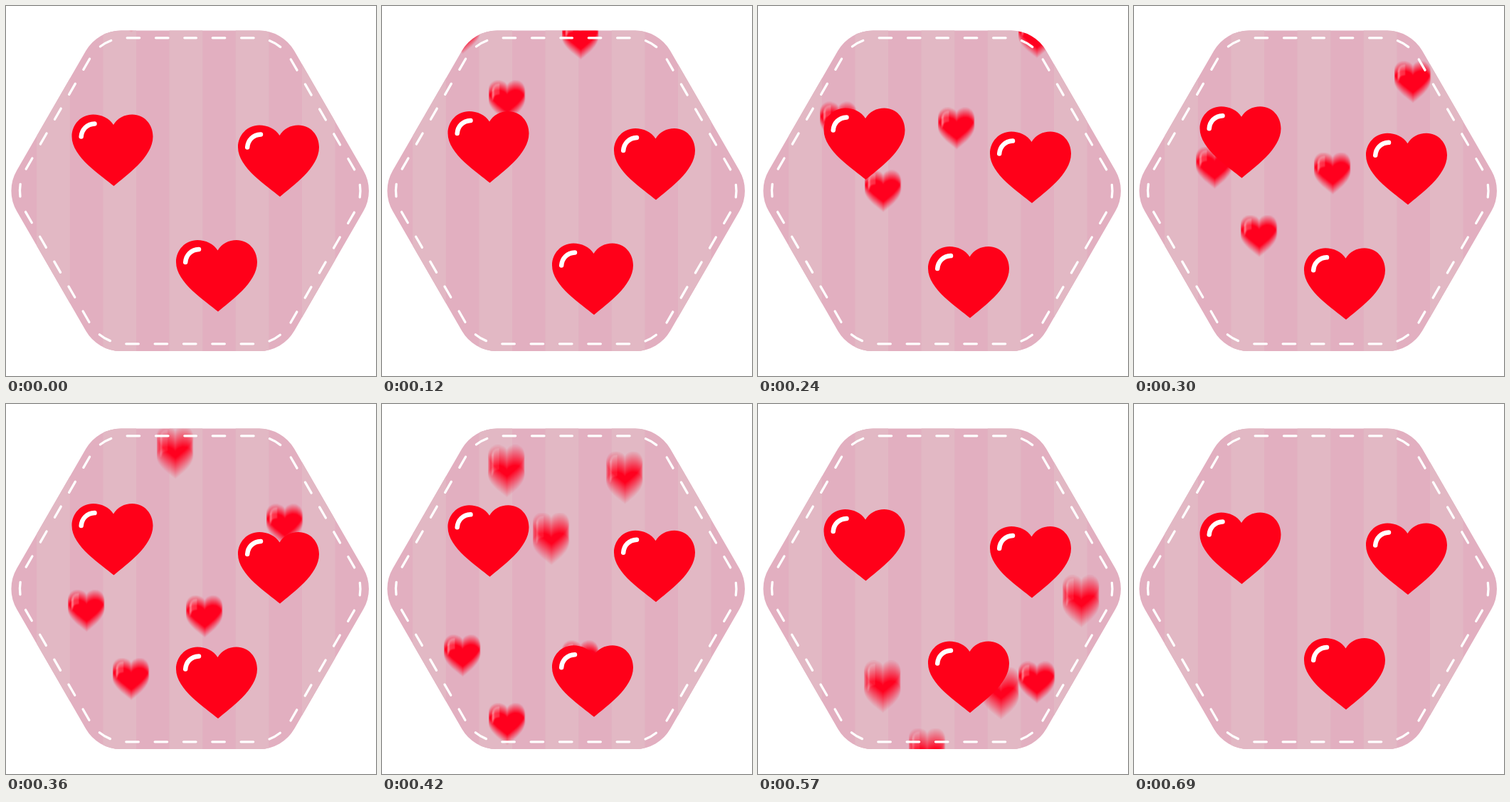
An HTML page with a canvas that plays this animation: 520 by 520 pixels, repeating every 0.72 s.

```html
<!DOCTYPE html>
<html lang="en">
<head>
<meta charset="utf-8">
<title>Falling hearts</title>
<style>
  html, body { margin: 0; width: 100%; height: 100%; overflow: hidden; background: #fff; }
  canvas { display: block; width: 520px; height: 520px; }
</style>
</head>
<body>
<canvas id="stage" width="520" height="520"></canvas>
<script>
const ctx = document.getElementById('stage').getContext('2d');

const STEP = 30, STEPS = 24;
const CENTER = { x: 258.7, y: 259.8 };
const RED = '#ff0019';
const PINK = '#e2afc0', PALE = '#e2b8c4';
const STRIPE = 46.6;
const BOB = 13;
const SMALL = 51.5 / 114;

// Resting top-left corner and bobbing direction
const bigHearts = [
  { x: 92.5, y: 152.5, dir: -1 },
  { x: 326, y: 167.5, dir: 1 },
  { x: 239, y: 329, dir: 1 }
];

// Each wave: fall per step, length of the vertical blur, [x, starting top]
const waves = [
  { speed: 31.6, blur: 14, drops: [[149.5, -22.5], [252.7, -110.5], [86.8, -118.5], [365.5, -239]] },
  { speed: 60.6, blur: 28, drops: [[149, -791], [315, -781.7], [211.5, -695.8], [428, -911]] }
];

function roundedHexagon(apothem, radius) {
  const path = new Path2D();
  const reach = apothem / Math.cos(Math.PI / 6);
  const corner = i => {
    const a = (i - 1) * Math.PI / 3;
    return [CENTER.x + reach * Math.cos(a), CENTER.y + reach * Math.sin(a)];
  };
  path.moveTo(CENTER.x, CENTER.y - apothem);
  for (let i = 0; i < 6; i++) path.arcTo(...corner(i), ...corner(i + 1), radius);
  path.closePath();
  return path;
}

const heartShape = new Path2D(
  'M58.5 14.5 C53 5 41 0 30 0 C13 0 0 14 0 31 C0 60 42 86 59 100.5 ' +
  'C76 86 114 60 114 31 C114 14 102 0 85 0 C74 0 64 5 58.5 14.5 Z');
const heartShine = new Path2D('M13.2 31 C14 21 21 13.5 32 13');

function drawHeart(c, x, y, scale = 1) {
  c.save();
  c.translate(x, y);
  c.scale(scale, scale);
  c.fillStyle = RED;
  c.fill(heartShape);
  c.strokeStyle = '#fff';
  c.lineWidth = 6.5;
  c.lineCap = 'round';
  c.stroke(heartShine);
  c.restore();
}

function makeCanvas(width, height) {
  const canvas = document.createElement('canvas');
  canvas.width = width;
  canvas.height = height;
  return canvas;
}

// Averages evenly shifted copies of a small heart into a vertical streak
function blurredHeart(length) {
  const copies = 15;
  const sharp = makeCanvas(54, 50);
  drawHeart(sharp.getContext('2d'), 0, 0, SMALL);
  const result = makeCanvas(54, 50 + length);
  const c = result.getContext('2d');
  c.globalCompositeOperation = 'lighter';
  c.globalAlpha = 1 / copies;
  for (let i = 0; i < copies; i++) c.drawImage(sharp, 0, length * i / (copies - 1));
  return result;
}

for (const wave of waves) wave.sprite = blurredHeart(wave.blur);

const badge = roundedHexagon(225.25, 57);
const seamApothem = 215, seamRadius = 58;
const seam = roundedHexagon(seamApothem, seamRadius);
const seamLength = 12 * (seamApothem - seamRadius) * Math.tan(Math.PI / 6) + 2 * Math.PI * seamRadius;

function drawStripes() {
  ctx.fillStyle = PINK;
  ctx.fillRect(0, 0, 520, 520);
  ctx.fillStyle = PALE;
  for (let i = 0; i < 5; i++) ctx.fillRect(43.2 + 2 * i * STRIPE, 0, STRIPE, 520);
}

function drawSeam() {
  const pitch = seamLength / 36, dash = 17.5;
  ctx.strokeStyle = '#fff';
  ctx.lineWidth = 3.3;
  ctx.lineCap = 'round';
  ctx.setLineDash([dash, pitch - dash]);
  ctx.lineDashOffset = dash / 2;
  ctx.stroke(seam);
  ctx.setLineDash([]);
}

function draw(step) {
  ctx.fillStyle = '#fff';
  ctx.fillRect(0, 0, 520, 520);

  ctx.save();
  ctx.clip(badge);
  drawStripes();
  for (const { speed, sprite, drops } of waves) {
    for (const [x, top] of drops) ctx.drawImage(sprite, x, top + speed * step);
  }
  ctx.restore();

  drawSeam();

  const half = (STEPS - 1) / 2;
  const bob = BOB * (1 - Math.abs(step / half - 1));
  for (const { x, y, dir } of bigHearts) drawHeart(ctx, x, y + dir * bob);
}

function tick() {
  draw(Math.floor(performance.now() / STEP) % STEPS);
  requestAnimationFrame(tick);
}
tick();
</script>
</body>
</html>
```
